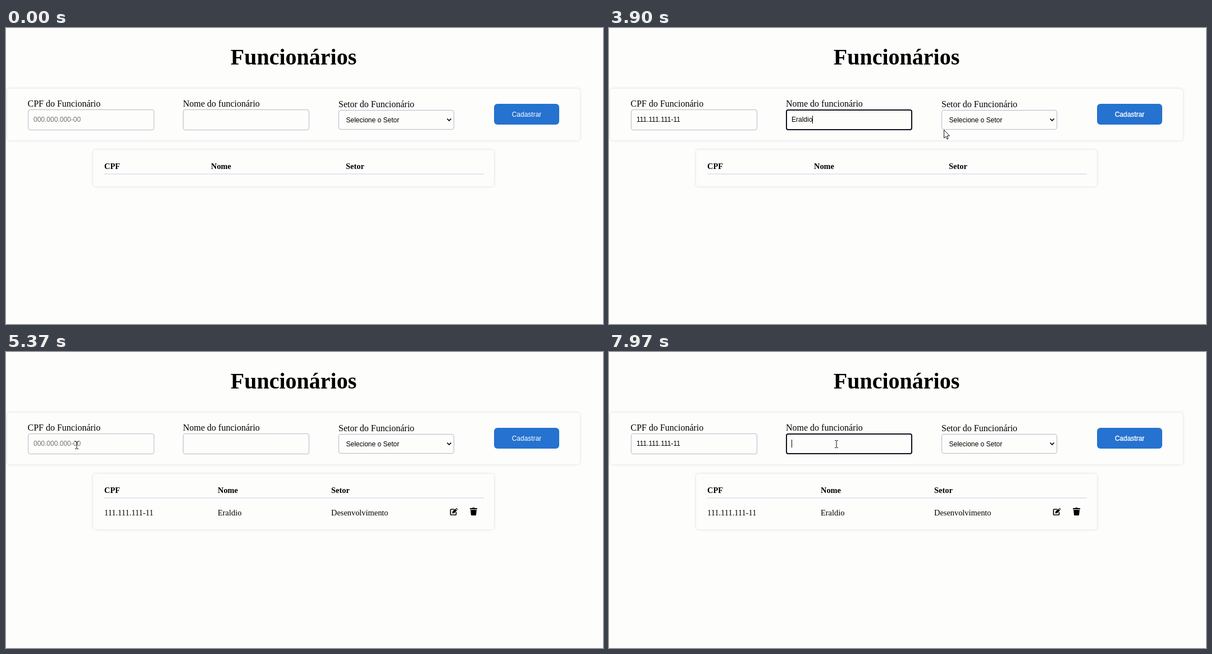
Write an HTML page that moves like this. It is 1063x527 px and loops after 8000 ms.

```html
<!DOCTYPE html>
<html lang="pt-BR">
<head>
<meta charset="utf-8">
<title>Funcionários</title>
<style>
  html, body { margin: 0; width: 100%; height: 100%; overflow: hidden; background: #fdfdfb; }
  #stage { position: relative; width: 1063px; height: 527px; overflow: hidden; color: #000;
    font: 16px/20px "Liberation Serif", "Times New Roman", serif; }
  #stage * { position: absolute; box-sizing: border-box; white-space: pre; }
  h1 { left: 0; width: 1024px; top: 29px; margin: 0; text-align: center; font: bold 40px/46px "Liberation Serif", serif; }
  .card { border-radius: 5px; box-shadow: 0 0 4px #d9d9e4; }
  #form { left: 2px; top: 108px; width: 1020px; height: 92px; }
  #table { left: 155px; top: 217px; width: 714px; }
  #rule { left: 175px; top: 259px; width: 676px; height: 2px; background: #e5e5f2; }
  .label { top: 125px; }
  .field { top: 145px; width: 225px; height: 37px; border: 1px solid #b8b8cc; border-radius: 4px; }
  .field.focus { border: 2px solid #10101c; }
  .field, #button { font: 12px/14px "Liberation Sans", Arial, sans-serif; }
  .field div { left: 9px; top: 10px; display: flex; }
  .field.focus div { left: 8px; top: 9px; }
  #sector { top: 146px; width: 206px; height: 35px; }
  #sector div { left: 12.5px; }
  #sector.focus div { left: 11.5px; }
  #stage .field span { position: static; }
  #stage .caret { width: 1px; height: 14px; background: #000; visibility: hidden; }
  #stage .empty + .caret { position: absolute; left: 0; }
  .empty { color: #757575; }
  #button { left: 869px; top: 135px; width: 116px; height: 37px; border-radius: 6px; background: #2572d0;
    color: #fff; text-align: center; line-height: 38px; }
  .cell { font-size: 14.4px; }
  b.cell { top: 236px; }
  #row .cell { top: 276px; }
  svg { left: 0; top: 0; width: 1px; height: 1px; overflow: visible; }
  .line { fill: none; stroke: #000; stroke-width: 1.7; }
</style>
</head>
<body>
<div id="stage">
  <h1>Funcionários</h1>
  <div class="card" id="form"></div>
  <span class="label" style="left:38.5px">CPF do Funcionário</span>
  <span class="label" style="left:315px">Nome do funcionário</span>
  <span class="label" style="left:592px;top:126px">Setor do Funcionário</span>
  <div class="field" id="cpf" style="left:39px"><div><span class="text"></span><span class="caret"></span></div></div>
  <div class="field" id="name" style="left:315px"><div><span class="text"></span><span class="caret"></span></div></div>
  <div class="field" id="sector" style="left:592px"><div><span class="text"></span><span class="caret"></span></div></div>
  <svg><path class="line" d="M785.5 161.5l3.5 3.5 3.5-3.5"/></svg>
  <div id="button">Cadastrar</div>

  <div class="card" id="table"></div>
  <b class="cell" style="left:175px">CPF</b>
  <b class="cell" id="headName">Nome</b>
  <b class="cell" id="headSector">Setor</b>
  <div id="rule"></div>
  <div id="row">
    <span class="cell" style="left:175px">111.111.111-11</span>
    <span class="cell" style="left:377px">Eraldio</span>
    <span class="cell" style="left:579px">Desenvolvimento</span>
    <svg>
      <path class="line" d="M798 280h-5.500q-1 0-1 1v8q0 1 1 1h8q1 0 1-1v-4"/>
      <path d="M795 284l5-5 3 3-5 5-3.500.5zM801 278l1-.5 2.500 2.500-1 1z"/>
      <path d="M826 278h4l1-1h3l1 1h4v2h-13zM827 281h11l-1 9q0 1-1 1h-7q-1 0-1-1z"/>
    </svg>
  </div>
  <svg id="cursor">
    <path id="beam" d="M-3-6.500h2l1 1 1-1h2M-3 6.500h2l1-1 1 1h2M0-6v12" fill="none" stroke="#111"/>
    <path id="arrow" d="M.5.500v14.500l3.500-3 2 5 2-1-2-5h4.500z" fill="#fff" stroke="#111"/>
  </svg>
</div>
<script>
const LOOP = 8000, SAVED = 4540, NAME = "Eraldio";
const $ = id => document.getElementById(id);
const clamp = (v, max) => Math.min(max, Math.max(0, v));
const ease = u => u * u * (3 - 2 * u);

const focusChanges = [
  { at: 0, id: "" }, { at: 770, id: "cpf" }, { at: 2600, id: "name" }, { at: 3950, id: "sector" },
  { at: 4500, id: "" }, { at: 5570, id: "cpf" }, { at: 7170, id: "name" }];

const moves = [
  { from: 30, to: 570, x: 180, y: 169 },    // CPF input
  { from: 2470, to: 2630, x: 438, y: 167 }, // name input
  { from: 3770, to: 4000, x: 700, y: 190 }, // sector select
  { from: 4120, to: 4300, x: 755, y: 196 },
  { from: 4330, to: 4480, x: 925, y: 160 }, // button
  { from: 4600, to: 5200, x: 126, y: 166 }, // CPF input
  { from: 7130, to: 7400, x: 405, y: 164 }]; // name input

// Number of keys pressed at time t, one every `step` ms.
const keys = (t, start, step, total) => clamp(Math.floor((t - start) / step) + 1, total);

const maskCpf = digits => digits
  .replace(/(\d{3})(?=\d)/g, "$1.")
  .replace(/\.(\d{1,2})$/, (tail, d) => (digits.length > 9 ? "-" : ".") + d);

// The mask is applied when each key is released.
function typedCpf(t, start, step) {
  const pressed = keys(t, start, step, 11), released = keys(t - 90, start, step, 11);
  return maskCpf("1".repeat(released)) + "1".repeat(pressed - released);
}

function cursorAt(t) {
  let x = 930, y = 190;
  for (const m of moves) {
    const u = ease(clamp((t - m.from) / (m.to - m.from), 1));
    x += (m.x - x) * u;
    y += (m.y - y) * u;
  }
  return [Math.round(x), Math.round(y)];
}

function setField(id, text, placeholder, focus, caretOn) {
  const field = $(id), [label, caret] = field.firstChild.children;
  field.classList.toggle("focus", focus == id);
  label.textContent = text || placeholder;
  label.classList.toggle("empty", !text);
  caret.style.visibility = focus == id && caretOn ? "visible" : "hidden";
}

function render(t) {
  const saved = t >= SAVED;
  const focus = focusChanges.filter(f => f.at <= t).pop();
  const caretOn = (t - focus.at) % 800 < 400;
  const cpf = saved ? typedCpf(t, 5670, 100) : typedCpf(t, 1030, 120);
  const name = saved ? "" : NAME.slice(0, keys(t, 3000, 105, NAME.length));
  const sector = t >= 4120 && !saved ? "Desenvolvimento" : "Selecione o Setor";

  setField("cpf", cpf, "000.000.000-00", focus.id, caretOn || cpf);
  setField("name", name, "", focus.id, caretOn || name);
  setField("sector", sector, "", focus.id, false);

  $("row").style.display = saved ? "block" : "none";
  $("table").style.height = saved ? "99px" : "65px";
  $("headName").style.left = saved ? "377px" : "365px";
  $("headSector").style.left = saved ? "579px" : "605px";
  const thinText = t < 900 || t >= 4600 && t < 5800;
  $("button").style.webkitTextStroke = thinText ? "0" : ".35px #fff";

  const [x, y] = cursorAt(t);
  const overInput = y > 145 && y < 182 && (x > 39 && x < 264 || x > 315 && x < 540);
  $("cursor").style.display = t < 30 ? "none" : "block";
  $("cursor").style.transform = `translate(${x}px, ${y}px)`;
  $("beam").style.display = overInput ? "inline" : "none";
  $("arrow").style.display = overInput ? "none" : "inline";
}

function tick() {
  render(performance.now() % LOOP);
  requestAnimationFrame(tick);
}
tick();
</script>
</body>
</html>
```
